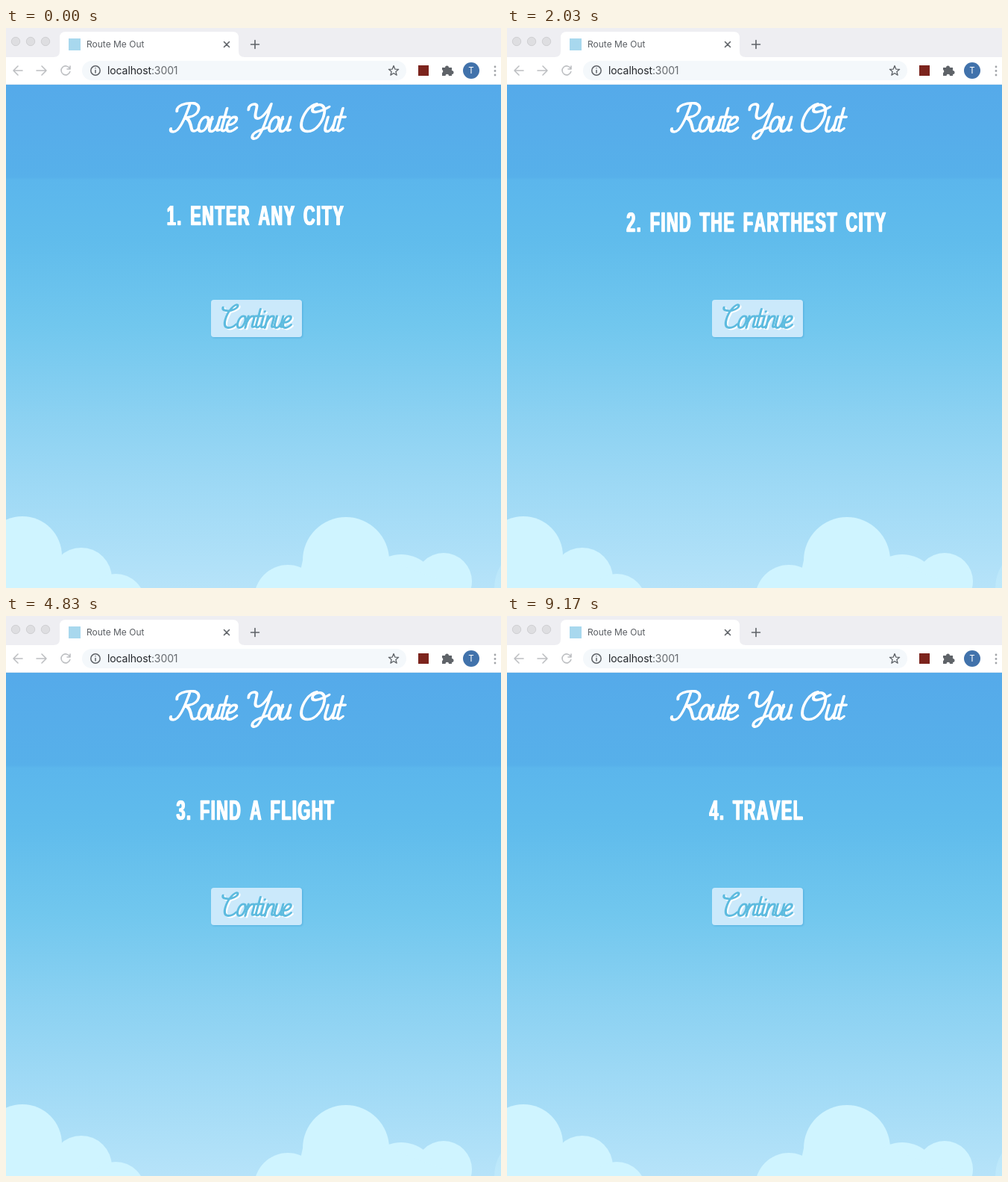
An HTML page for the animation above (9.24 s loop, 664 by 750 pixels).

```html
<!DOCTYPE html>
<html lang="en">
<head>
<meta charset="utf-8">
<title>Route Me Out</title>
<style>
html, body { margin: 0; width: 100%; height: 100%; overflow: hidden; }
svg { position: absolute; left: 0; top: 0; width: 100%; height: 100%; }
svg text { font-family: Inter, Roboto, sans-serif; }
.line { fill: none; stroke-linecap: round; stroke-linejoin: round; }
#window { position: absolute; left: 0; top: 238px; width: 100%; height: 50px; overflow: hidden; contain: strict; }
#step {
  font: bold 36px/45px "Liberation Sans", Arial, sans-serif;
  letter-spacing: 2.5px; word-spacing: 5px; font-kerning: none; white-space: nowrap; text-align: center;
  color: #fff; -webkit-text-stroke: .6px #fff; text-shadow: 1.3px 0 #fff, -1.3px 0 #fff;
}
</style>
</head>
<body>
<svg viewBox="0 0 664 750">
  <defs>
    <linearGradient id="sky" x2="0" y2="1">
      <stop offset="0" stop-color="#55aaea"/>
      <stop offset=".185" stop-color="#57b0ea"/>
      <stop offset=".19" stop-color="#5bb6ec"/>
      <stop offset=".31" stop-color="#60bcec"/>
      <stop offset=".48" stop-color="#71c7ee"/>
      <stop offset=".67" stop-color="#8dd2f2"/>
      <stop offset=".8" stop-color="#9ed9f5"/>
      <stop offset="1" stop-color="#b6e3f9"/>
    </linearGradient>
    <filter id="soft" x="-10%" y="-20%" width="120%" height="140%">
      <feDropShadow dx="1" dy="1" stdDeviation="1.2" flood-color="#2f93cc" flood-opacity=".45"/>
    </filter>
  </defs>

  <!-- page -->
  <rect y="75" width="664" height="675" fill="url(#sky)"/>
  <g fill="#cff4ff">
    <circle cx="22" cy="707" r="53"/>
    <circle cx="101" cy="737" r="41"/>
    <circle cx="147" cy="771" r="40"/>
    <path d="M0 707H75L101 737V750H0z"/>
    <circle cx="378" cy="764" r="45"/>
    <circle cx="456" cy="713" r="58"/>
    <circle cx="530" cy="755" r="50"/>
    <circle cx="587" cy="741" r="38"/>
    <path d="M398 713H514L587 741V750H390z"/>
    <circle cx="712" cy="750" r="57" opacity=".3"/>
  </g>
  <rect x="275" y="364" width="122" height="50" rx="4" fill="#cbe9fb" filter="url(#soft)"/>
  <g id="lettering"></g>

  <!-- browser -->
  <rect width="664" height="40" fill="#eeeef2"/>
  <rect y="39" width="664" height="36" fill="#fff"/>
  <rect y="75" width="664" height="1" fill="#dfeaf2"/>
  <path fill="#fff" d="M64 39Q72 39 72 31V13Q72 5 80 5H304Q312 5 312 13V31Q312 39 320 39z"/>
  <g fill="#dedee1" stroke="#d0d0d3">
    <circle cx="13" cy="18" r="5.7"/><circle cx="33" cy="18" r="5.7"/><circle cx="53" cy="18" r="5.7"/>
  </g>
  <rect x="84" y="14" width="16" height="16" fill="#a8d8ee"/>
  <text x="108" y="26" font-size="12" fill="#5a5e63">Route Me Out</text>
  <g class="line" stroke="#5f6368" stroke-width="1.6">
    <path d="M292.5 18.500l7 7m0-7l-7 7M328.500 22h11m-5.500-5.500v11"/>
    <g stroke="#bdbfc2"><path d="M22 57H10m6-6l-6 6 6 6M41 57h13m-6-6l6 6-6 6M85.300 54a6 6 0 1 0 .5 4.500M86 51v4h-4"/></g>
  </g>
  <rect x="102" y="44" width="435" height="26" rx="13" fill="#f4f8fb"/>
  <g class="line" stroke="#5f6368" stroke-width="1.5">
    <circle cx="120" cy="57" r="6.200"/>
    <path d="M120 56.500v3.500M120 53.700v.1"/>
    <path id="star" stroke-width="1.300"/>
  </g>
  <text x="136" y="62" font-size="14" letter-spacing="-.1" fill="#24272b">localhost<tspan fill="#666a6e">:3001</tspan></text>
  <rect x="553" y="50" width="14" height="14" fill="#7c241d"/>
  <path fill="#5f6368" d="M585 53h4a2.500 2.500 0 0 1 5 0h4v4a2.500 2.500 0 0 1 0 5v2h-4a2.200 2.200 0 0 0-4.500 0h-4.500v-4a2.200 2.200 0 0 0 0-4z"/>
  <circle cx="624" cy="57" r="11" fill="#4172ab"/>
  <text x="624" y="61.200" font-size="11.500" text-anchor="middle" fill="#fff">T</text>
  <g fill="#a2a5a9">
    <circle cx="656" cy="52" r="1.400"/><circle cx="656" cy="57.500" r="1.400"/><circle cx="656" cy="63" r="1.400"/>
  </g>
</svg>
<div id="window"><div id="step"></div></div>

<script>
const $ = id => document.getElementById(id);

// Single-line script letters: advance and pen path, baseline at 0
const pen = {
  C: [22, 'M-7-35C-7-29 2-28 8-30C14-32 18-36 15-39C11-42 2-30 2-14C2-3 6 0 11 0Q17 0 21-6'],
  R: [32, 'M14-36C13-22 11-8 7-2C4 2-2 1-2-4M0-28C-3-36 8-40 18-39C30-38 30-22 18-20C15-19 13-19 12-19C18-19 22-10 25-3Q28 2 33-3'],
  Y: [29, 'M-2-30C-4-37 4-40 7-36C9-32 6-19 12-18C18-17 23-28 25-38C25-20 23 2 19 8C16 12 11 10 12 5C13 0 22-3 30-6'],
  O: [31, 'M14-38C4-36 0-22 1-12C2-3 6 0 12 0C23 0 28-14 27-25C26-35 20-39 14-36C8-33 10-26 16-27Q23-28 31-34'],
  o: [13, 'M7-20C2-20 1-12 1-9C1-3 3 0 6 0C11 0 12-8 12-11C12-17 10-20 7-20M11-16Q13-14 16-17'],
  n: [14, 'M2-20V0M2-9C3-16 6-20 9-20C12-20 12-17 12-14V-4Q12 0 16-2'],
  t: [9, 'M4-32V-5Q4 0 8-1L11-4M-1-20H10'],
  i: [8, 'M3-20V-5Q3 0 7-1L9-3M3-28v.5'],
  u: [14, 'M2-20V-7Q2 0 6 0C9 0 11-5 12-10M12-20V-5Q12 0 16-2'],
  e: [12, 'M2-9C8-9 11-13 11-16C11-19 9-20 7-20C3-20 1-14 1-9C1-3 3 0 6 0Q10 0 14-5'],
  ' ': [13, '']
};

function script(words, x, y, size, color, label = true) {
  let at = 0, paths = '';
  for (const c of words) {
    paths += `<path transform="translate(${at})" d="${pen[c][1]}"/>`;
    at += pen[c][0];
  }
  const role = label ? `role="img" aria-label="${words}"` : 'aria-hidden="true"';
  return `<g class="line" ${role} stroke="${color}" stroke-width="3.6"
    transform="translate(${x} ${y}) scale(${size} ${size * .92}) skewX(-14)">${paths}</g>`;
}

$('lettering').innerHTML =
  script('Route You Out', 222, 138.5, 1.05, '#fff') +
  script('Continue', 291.5, 403, .85, '#fff', false) +
  script('Continue', 289.5, 401.5, .85, '#5dbbdf');

const star = Array.from({ length: 10 }, (_, k) => {
  const r = k % 2 ? 3 : 7, a = k * Math.PI / 5;
  return [520 + r * Math.sin(a), 57.5 - r * Math.cos(a)];
});
$('star').setAttribute('d', `M${star.join('L')}z`);

const loop = 9240, tick = 70, half = 300, travel = 50;
const steps = ['1. ENTER ANY CITY', '2. FIND THE FARTHEST CITY', '3. FIND A FLIGHT', '4. TRAVEL'];
const starts = [-430, 1330, 3803, 6370];

// The old step drops out with ease-in, then the new one drops in with ease-out.
function draw(now) {
  const t = Math.floor(now % loop / tick) * tick;
  const i = starts.findLastIndex(s => s <= t);
  const u = (t - starts[i]) / half;
  const y = u < 1 ? u ** 3 : -(Math.max(0, 2 - u) ** 3);
  $('step').textContent = steps[u < 1 ? i - 1 : i];
  $('step').style.transform = `translate(3px, ${y * travel}px) scaleX(.6)`;
}

const begin = performance.now();
function frame() {
  draw(performance.now() - begin);
  requestAnimationFrame(frame);
}
frame();
</script>
</body>
</html>
```
